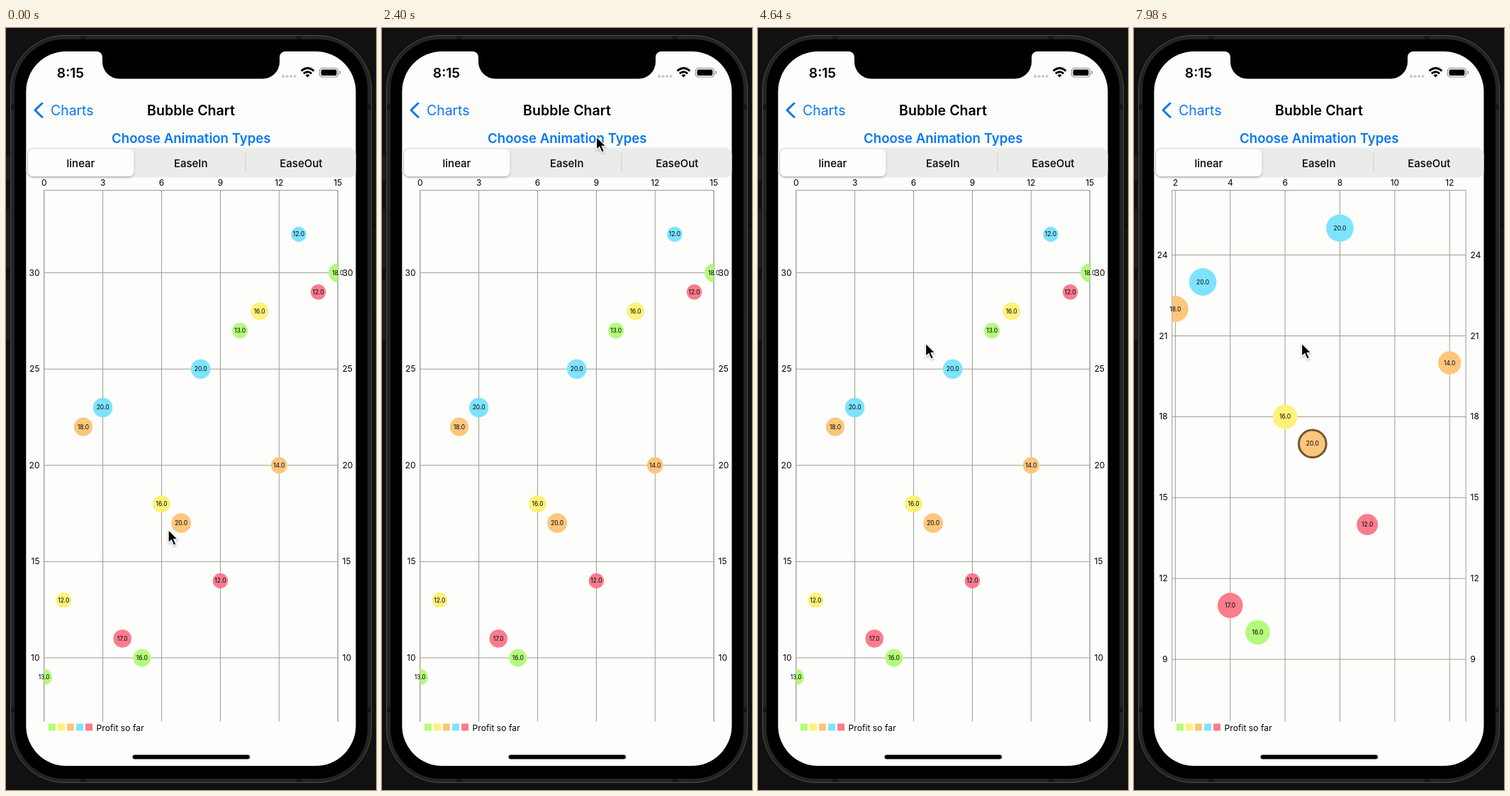
These frames come from a looping animation (522x1073 px, 8 s). An HTML page:

```html
<!DOCTYPE html>
<html lang="en">
<head>
<meta charset="utf-8">
<title>Bubble Chart</title>
<style>
  html, body { margin: 0; width: 522px; height: 1073px; overflow: hidden; background: #111; }
  svg { display: block; font-family: Inter, Roboto, sans-serif; }
  text { dominant-baseline: central; }
  .mid { text-anchor: middle; }
  .axis { font-size: 12px; }
  .value { font-size: 8.5px; }
  .blue { fill: #0a78f2; }
  .tab { font-size: 15px; font-weight: 500; text-anchor: middle; }
  .grid { stroke: #9c9c94; fill: none; }
</style>
</head>
<body>
<svg width="522" height="1073" viewBox="0 0 522 1073">
  <defs>
    <clipPath id="plot"><rect x="53.7" y="228.5" width="414.5" height="748"/></clipPath>
    <filter id="soft" x="-50%" y="-50%" width="200%" height="200%">
      <feDropShadow dx="0" dy="1.5" stdDeviation="1.8" flood-opacity=".3"/>
    </filter>
  </defs>

  <!-- phone body -->
  <g fill="#1b1b1b">
    <rect y="180" width="5" height="35"/><rect y="256" width="5" height="83"/>
    <rect y="356" width="5" height="83"/><rect x="518" y="282" width="4" height="120" fill="#161616"/>
  </g>
  <rect x="6.5" y="10.5" width="509" height="1052" rx="76" fill="#232323" stroke="#4d4d4a"/>
  <path d="M109 11v5M413 11v5M109 1057v5M413 1057v5M7 111h5M510 111h5M7 960h5M510 960h5" stroke="#161616" stroke-width="7"/>
  <rect x="12" y="16" width="498" height="1041" rx="70"/>
  <rect x="28.3" y="33" width="465.2" height="1006" rx="56.500" fill="#fdfdfb"/>
  <path d="M128 32V33A8 8 0 0 1 136 41V47.500A24 24 0 0 0 160 71.500H362A24 24 0 0 0 386 47.500V41A8 8 0 0 1 394 33V32Z"/>
  <rect x="178.500" y="1023.500" width="165.500" height="6" rx="3"/>

  <!-- status and navigation -->
  <text x="91" y="63" class="mid" font-size="19.2" font-weight="600">8:15</text>
  <g fill="#c9c9c9">
    <circle cx="391" cy="68" r="2"/><circle cx="396.500" cy="68" r="2"/>
    <circle cx="402" cy="68" r="2"/><circle cx="407.500" cy="68" r="2"/>
  </g>
  <g fill="none" stroke="#000" stroke-width="2.800">
    <path d="M416.500 60.500Q425.500 52.500 434.500 60.500M419.800 64.200Q425.500 59.300 431.200 64.200"/>
    <path d="M422.500 66.500Q425.500 64 428.500 66.500L425.500 69.500Z" fill="#000" stroke="none"/>
    <rect x="442.500" y="56.500" width="26" height="12.500" rx="4" stroke="#8b8b8b" stroke-width="1.200"/>
    <rect x="444.500" y="58.500" width="22" height="8.500" rx="2.200" fill="#000" stroke="none"/>
    <path d="M470.500 60.500q2 2.200 0 4.500" stroke="#8b8b8b" stroke-width="1.200"/>
  </g>
  <path d="M51 106L41 115.700L51 125.500" fill="none" stroke="#0a78f2" stroke-width="3" stroke-linecap="round" stroke-linejoin="round"/>
  <text x="63" y="116" class="blue" font-size="19.4">Charts</text>
  <text x="261" y="116" class="mid" font-size="19.6" font-weight="600">Bubble Chart</text>
  <text x="261.3" y="155" class="mid blue" font-size="18.6" font-weight="600">Choose Animation Types</text>

  <!-- segmented control -->
  <rect x="28.500" y="168.500" width="465" height="42" rx="9" fill="#ebebe9"/>
  <rect x="31" y="170.500" width="149.500" height="38.500" rx="8" fill="#fefefe" filter="url(#soft)"/>
  <path d="M338 177V203" stroke="#d2d2d0"/>
  <text x="105.500" y="190" class="tab">linear</text>
  <text x="260.700" y="190" class="tab">EaseIn</text>
  <text x="416.300" y="190" class="tab">EaseOut</text>

  <g id="full"></g>
  <g id="zoomed"></g>
  <g id="legend"></g>
  <text x="127.500" y="985" font-size="12.2">Profit so far</text>

  <path id="cursor" d="M0 0V18.500L4.300 14.500L7.600 22L11 20.500L7.800 13.300H13.500Z" stroke="#fff" stroke-width="1.300" filter="url(#soft)"/>
</svg>
<script>
const LEFT = 53.7, RIGHT = 468.2, TOP = 228.5, BOTTOM = 976.5;
const LOOP = 8000, ZOOM_AT = 5300;
const colors = ['#b3fb7c', '#fef17c', '#fdc67d', '#7ee3fe', '#fa7c8d'];
const heights = [9, 13, 22, 23, 11, 10, 18, 17, 25, 14, 27, 28, 20, 32, 29, 30];
const sizes = [13, 12, 18, 20, 17, 16, 16, 20, 20, 12, 13, 16, 14, 12, 12, 18];
const $ = id => document.getElementById(id);

const label = (x, y, s, cls, anchor = 'middle') =>
  `<text x="${x}" y="${y}" class="${cls}" text-anchor="${anchor}">${s}</text>`;

// Scale grows from (235.4, BOTTOM), where the chart is double-tapped.
function chart(scale, stepX, stepY, selected) {
  const unit = 27.633 * scale;
  const px = x => 235.4 + (LEFT + 27.633 * x - 235.4) * scale;
  const py = y => BOTTOM - 27.11 * scale * (y - 6.695);
  const inX = x => x > LEFT - 1 && x < RIGHT + 1;
  const inY = y => y > TOP && y < BOTTOM;
  let lines = `M${LEFT} ${BOTTOM}V${TOP}H${RIGHT}V${BOTTOM}`, axes = '', bubbles = '', values = '';

  for (let v = 0; v <= 15; v += stepX) {
    const x = px(v);
    if (!inX(x)) continue;
    lines += `M${x} ${TOP}V${BOTTOM}`;
    axes += label(x, 217.5, v, 'axis');
  }
  for (let v = 0; v <= 35; v += stepY) {
    const y = py(v);
    if (!inY(y)) continue;
    lines += `M${LEFT} ${y}H${RIGHT}`;
    axes += label(47.5, y - .5, v, 'axis', 'end') + label(474.5, y - .5, v, 'axis', 'start');
  }
  heights.forEach((h, i) => {
    const x = px(i), y = py(h), r = unit / 2 * Math.sqrt(sizes[i] / 20);
    const ring = i === selected ? 'stroke="#6d5535" stroke-width="3"' : '';
    bubbles += `<circle cx="${x}" cy="${y}" r="${r}" fill="${colors[i % 5]}" ${ring}/>`;
    if (inX(x) && inY(y)) values += label(x, y, sizes[i].toFixed(1), 'value');
  });
  return `<path class="grid" d="${lines}"/><g clip-path="url(#plot)">${bubbles}</g>${axes}${values}`;
}

$('full').innerHTML = chart(1, 3, 5);
$('zoomed').innerHTML = chart(1.4, 2, 3, 7);
$('legend').innerHTML = colors.map((c, i) =>
  `<rect x="${60 + 13 * i}" y="979.5" width="10" height="10" fill="${c}"/>`).join('');

// Pointer moves: start, end, target x, target y
const moves = [[1660, 2300, 302.5, 153], [2600, 3250, 278.5, 184], [3600, 4400, 236.5, 444]];

function pointer(t) {
  let x = 229, y = 706.5;
  for (const [start, end, toX, toY] of moves) {
    const p = Math.min(1, Math.max(0, (t - start) / (end - start)));
    const k = p * p * (3 - 2 * p);
    x += (toX - x) * k;
    y += (toY - y) * k;
  }
  return [x, y];
}

function draw(now) {
  const t = now % LOOP, zoom = t >= ZOOM_AT;
  $('full').style.display = zoom ? 'none' : '';
  $('zoomed').style.display = zoom ? '' : 'none';
  $('cursor').setAttribute('transform', `translate(${pointer(t)})`);
  requestAnimationFrame(draw);
}
draw(performance.now());
</script>
</body>
</html>
```
